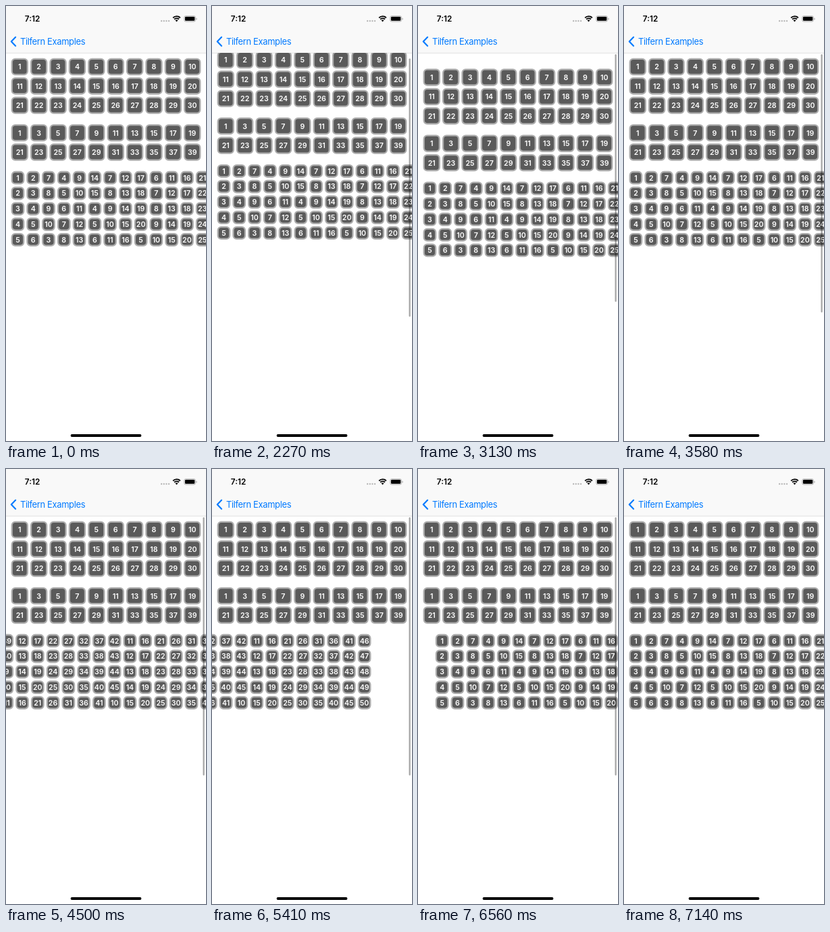
These frames come from a looping animation (296x640 px, 7180 ms). An HTML page:

```html
<!DOCTYPE html>
<html lang="en">
<head>
<meta charset="utf-8">
<title>Number grids</title>
<style>
  html, body { margin: 0; width: 100%; height: 100%; overflow: hidden; background: #fff; }
  svg { position: absolute; left: 0; top: 0; width: 296px; height: 640px; }
  text { font-family: Inter, Roboto, sans-serif; }
  .cell rect { fill: #5a5a5a; stroke: #adadad; stroke-width: 3; }
  .cell text { fill: #fff; font-size: 14px; font-weight: 600; text-anchor: middle; }
  #nav { position: absolute; left: 0; top: 0; width: 296px; height: 69px;
    background: rgba(249, 249, 249, .94); backdrop-filter: blur(14px); }
</style>
</head>
<body>
<!-- One unit is 296 / 390 px -->
<svg viewBox="0 0 390 843.24">
  <g id="page"><g id="grids"></g><g id="strip"></g></g>
  <rect id="bar" x="384" width="3" rx="1.5"/>
</svg>
<div id="nav"></div>
<svg viewBox="0 0 390 843.24">
  <rect y="90.8" width="390" height=".5" fill="#000" opacity=".3"/>
  <text x="51.4" y="30.2" font-size="15.5" font-weight="600" text-anchor="middle">7:12</text>
  <path d="M303.2 29h15" stroke="#000" stroke-width="3.2" stroke-linecap="round"
    stroke-dasharray="0 4.8" opacity=".25"/>
  <g fill="none" stroke="#000" stroke-width="2.4">
    <path d="M325.6 22.9A10 10 0 0 1 339.8 22.9"/>
    <path d="M328.2 25.7A6.3 6.3 0 0 1 337.2 25.7"/>
  </g>
  <path d="M332.7 30.6L330 27.8A4 4 0 0 1 335.4 27.8Z"/>
  <rect x="347.5" y="19.3" width="22" height="11" rx="3" fill="none" stroke="#000" opacity=".35"/>
  <rect x="349" y="20.8" width="19" height="8" rx="1.8"/>
  <path d="M371 23v4a2.2 2.2 0 0 0 0-4" opacity=".4"/>
  <path d="M18.6 60.3L10.3 68.8L18.6 77.3" fill="none" stroke="#007aff" stroke-width="2.8"
    stroke-linecap="round" stroke-linejoin="round"/>
  <text x="27.6" y="74.9" font-size="17" letter-spacing="-.43" fill="#007aff">Tilfern Examples</text>
  <rect x="126" y="830.2" width="138" height="5" rx="2.5"/>
</svg>
<script>
const LOOP = 7180;
const $ = id => document.getElementById(id);

function cell(n, cx, cy, size) {
  const h = size / 2 - 1.5;
  return `<g class="cell"><rect x="${cx - h}" y="${cy - h}" width="${2 * h}" height="${2 * h}" rx="6.5"/>` +
    `<text x="${cx}" y="${cy + 5.1}">${n}</text></g>`;
}

// Rows of ten
function grid(count, top, value) {
  const pitch = 37.4;
  return Array.from({ length: count }, (_, i) =>
    cell(value(i), 8 + pitch * (i % 10 + .5), top + pitch * (Math.floor(i / 10) + .5), 33.4)).join('');
}
$('grids').innerHTML = grid(30, 99, i => i + 1) + grid(20, 227.2, i => 2 * i + 1);

// Columns of five, filled with the runs k..5k
const runs = [];
for (let k = 1; k <= 10; k++) for (let n = k; n <= 5 * k; n++) runs.push(n);
$('strip').innerHTML = runs.map((n, i) =>
  cell(n, 23 + 30 * Math.floor(i / 5), 333 + 30 * (i % 5), 26)).join('');

// The screen refreshes in bursts: [first, last, count]
const bursts = [[2270, 2400, 2], [2550, 3580, 10], [4070, 5160, 11], [5410, 7140, 17]];
const ticks = bursts.flatMap(([a, b, n]) => Array.from({ length: n }, (_, i) =>
  Math.floor((a + (b - a) * i / (n - 1)) / 10) * 10));

const swipe = x => x * x * (3 - 2 * x);
const settle = x => 1 - (1 - x) ** 3;

// Moves: [start, end, target value, easing]
const scrollY = [[2241, 2420, 187, swipe], [2550, 3000, -41.3, swipe], [3000, 3580, 0, settle]];
const scrollX = [[4040, 4687, 1155, swipe], [4687, 5160, 1146, settle],
  [5254.5, 6310, -50, swipe], [6310, 7140, 0, settle]];
const barAlpha = [[2260, 2270, .35, swipe], [6800, 7140, 0, swipe]];

function at(moves, t) {
  return moves.reduce((v, [start, end, to, ease]) =>
    v + (to - v) * ease(Math.min(1, Math.max(0, (t - start) / (end - start)))), 0);
}

function draw(now) {
  const time = now % LOOP;
  const t = ticks.filter(k => k <= time).pop() || 0;
  const y = at(scrollY, t);
  $('page').setAttribute('transform', `translate(0 ${-y})`);
  $('strip').setAttribute('transform', `translate(${-at(scrollX, t)} 0)`);
  // The bar travels with the page and shrinks when pulled past the top
  $('bar').setAttribute('y', 93.6 + .62 * Math.max(0, y));
  $('bar').setAttribute('height', 500.6 + Math.min(0, y));
  $('bar').setAttribute('opacity', at(barAlpha, t));
}

const start = performance.now();
function loop() {
  draw(performance.now() - start);
  requestAnimationFrame(loop);
}
loop();
</script>
</body>
</html>
```
